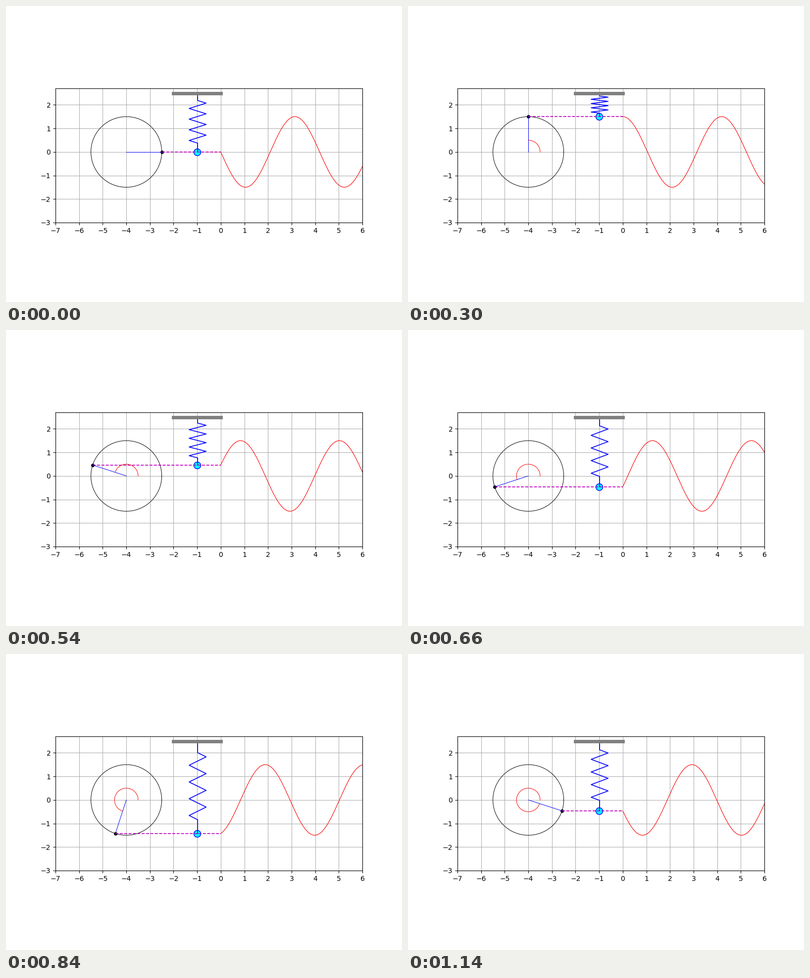
A matplotlib script for the animation above (1.2 s loop, 800 by 600 pixels).

```python
import numpy as np
import matplotlib.pyplot as plt
from matplotlib.animation import FuncAnimation

FRAMES = 20
INTERVAL = 60
RADIUS = 1.5
CENTER = -4
BOB_X = -1
CEILING = 2.5
WAVE_NUMBER = 1.5

# Spring outline: sideways offset and fraction of the length, top to bottom
COILS = 8
SPRING_X = -0.98
swing = 0.36 * (-1.0) ** np.arange(COILS)
spring_x = SPRING_X + np.concatenate([[0, 0], swing, [0, 0]])
top, bottom = 0.125, 0.85
peaks = top + (np.arange(COILS) + 0.5) * (bottom - top) / COILS
spring_part = np.concatenate([[0, top], peaks, [bottom, 1]])

fig, ax = plt.subplots(figsize=(8, 6), dpi=100)
ax.set_aspect("equal")
ax.set_xlim(-7, 6)
ax.set_ylim(-3, 2.7)
ax.set_xticks(range(-7, 7))
ax.set_yticks(range(-3, 3))
ax.grid(True)
ax.set_axisbelow(True)

turn = np.linspace(0, 2 * np.pi, 200)
wave_x = np.linspace(0, 6, 200)

ax.plot(CENTER + RADIUS * np.cos(turn), RADIUS * np.sin(turn), "k", lw=0.7)
dot, = ax.plot([], [], "ko", ms=4)
bob, = ax.plot([], [], "o", ms=10, mfc="cyan", mec="blue")
spring, = ax.plot([], [], "b", lw=1.2)
ax.plot([BOB_X - 1, BOB_X + 1], [CEILING, CEILING], color="gray", lw=5)
link, = ax.plot([], [], "m--", lw=1.2)
arm, = ax.plot([], [], "b", lw=0.7)
arc, = ax.plot([], [], "r", lw=0.7)
wave, = ax.plot([], [], "r", lw=0.8)


def update(frame):
    angle = 2 * np.pi * frame / FRAMES
    x = CENTER + RADIUS * np.cos(angle)
    y = RADIUS * np.sin(angle)
    dot.set_data([x], [y])
    bob.set_data([BOB_X], [y])
    spring.set_data(spring_x, CEILING + (y - CEILING) * spring_part)
    link.set_data([x, 0], [y, y])
    arm.set_data([CENTER, x], [0, y])
    sweep = np.linspace(0, angle, 100)
    arc.set_data(CENTER + 0.5 * np.cos(sweep), 0.5 * np.sin(sweep))
    wave.set_data(wave_x, RADIUS * np.sin(angle - WAVE_NUMBER * wave_x))
    return dot, bob, spring, link, arm, arc, wave


animation = FuncAnimation(fig, update, frames=FRAMES, interval=INTERVAL,
                          repeat=True, repeat_delay=0)
plt.show()
```
